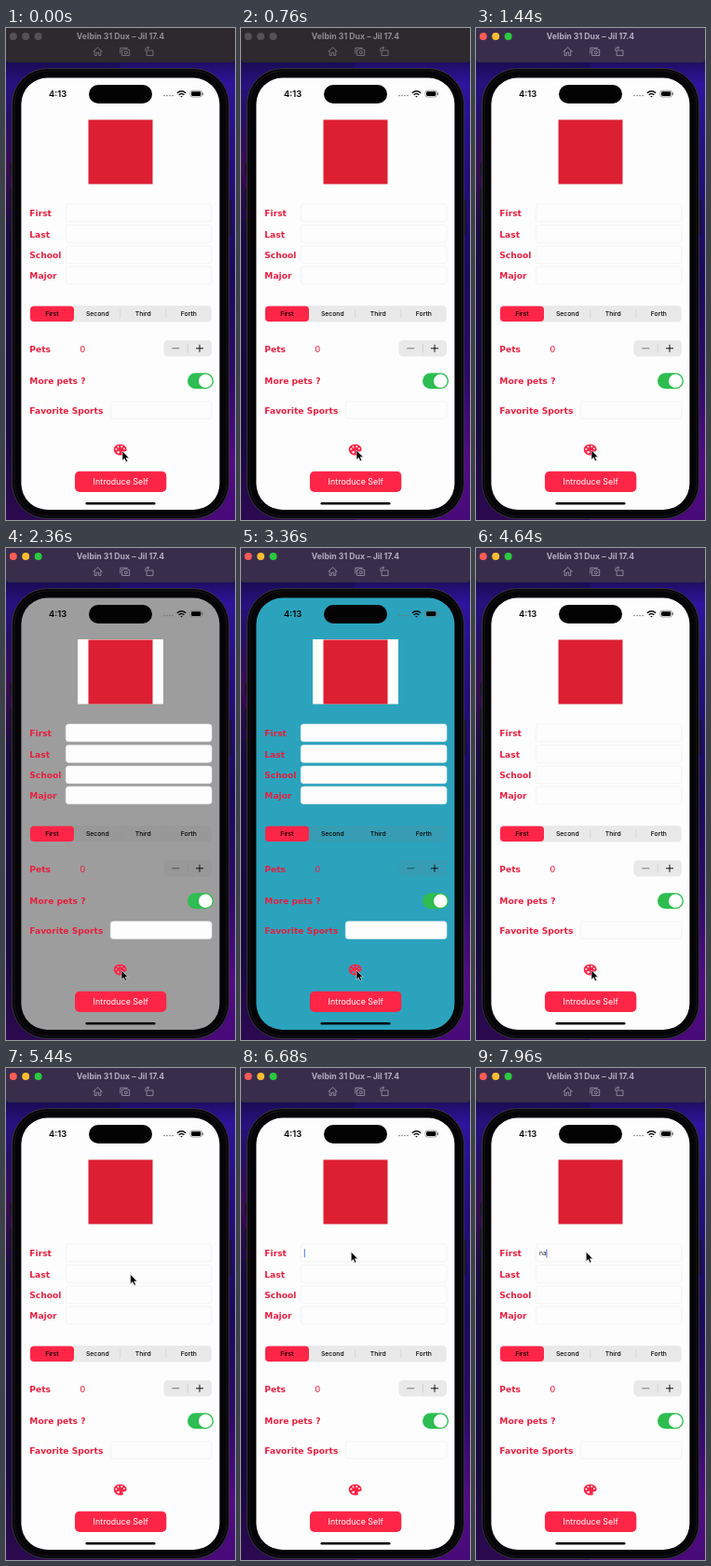
Animation, 246 px wide and 528 px high, one loop 8000 ms. Source, as an HTML page:

```html
<!DOCTYPE html>
<html lang="en">
<head>
<meta charset="utf-8">
<title>Simulator form</title>
<style>
  html, body { margin: 0; width: 100%; height: 100%; overflow: hidden; background: #1b0b50; }
  svg { display: block; width: 100vw; height: 100vh; }
  text { font-family: Inter, sans-serif; }
  .label { font: bold 9.15px "DejaVu Sans", sans-serif; fill: #e5203f; }
  .field { fill: #fdfdfd; stroke: #ececee; stroke-width: .6; }
  .tint { fill: #787880; fill-opacity: .15; }
  .red { fill: #fe2547; }
  .mid { text-anchor: middle; }
  .icon { fill: none; stroke-width: .8; stroke-linejoin: round; stroke-linecap: round; }
</style>
</head>
<body>
<svg viewBox="0 0 246 528" preserveAspectRatio="none">
  <defs>
    <linearGradient id="deskLeft" x2="0" y2="1">
      <stop offset=".08" stop-color="#28138a"/>
      <stop offset=".18" stop-color="#260f66"/>
      <stop offset=".28" stop-color="#380d50"/>
      <stop offset=".42" stop-color="#180a42"/>
      <stop offset=".8" stop-color="#15083c"/>
      <stop offset="1" stop-color="#2c0a50"/>
    </linearGradient>
    <linearGradient id="deskRight" x2="0" y2="1">
      <stop offset=".08" stop-color="#3016a4"/>
      <stop offset=".2" stop-color="#28108a"/>
      <stop offset=".5" stop-color="#1a0a5c"/>
      <stop offset=".7" stop-color="#2c0a66"/>
      <stop offset=".88" stop-color="#500c84"/>
      <stop offset="1" stop-color="#480a78"/>
    </linearGradient>
    <linearGradient id="shade" x2="0" y2="1">
      <stop offset="0" stop-opacity=".45"/>
      <stop offset="1" stop-opacity="0"/>
    </linearGradient>
  </defs>
  <rect width="123" height="528" fill="url(#deskLeft)"/>
  <rect x="123" width="123" height="528" fill="url(#deskRight)"/>
  <rect y="34" width="246" height="26" fill="url(#shade)"/>

  <!-- window bar -->
  <path id="bar" d="M0 0H246V33Q246 37 242 37H4Q0 37 0 33Z"/>
  <g id="lights"><circle cx="7.8" cy="9" r="4"/><circle cx="21.2" cy="9" r="4"/><circle cx="34.6" cy="9" r="4"/></g>
  <text id="title" class="mid" x="123" y="12" font-size="8.75" font-weight="700">Velbin 31 Dux – Jil 17.4</text>
  <g id="icons" class="icon">
    <path d="M93.8 25.2 98.5 20.8 103.2 25.2M95.2 24.5V29.5H97.3V26.3H99.7V29.5H101.8V24.5"/>
    <path d="M122.8 27.3V21.3H130.5M125 23.3H126.6L127.4 22.3H129.8L130.6 23.3H132.7V29.5H125Z"/>
    <circle cx="128.8" cy="26.3" r="1.6"/>
    <path d="M151.5 24H158V29.6H151.5ZM149.8 24.5V22.6Q149.8 21.2 151.2 21.2H153.5M152.3 20 153.6 21.2 152.3 22.4"/>
  </g>

  <!-- phone -->
  <path fill="#17141d" d="M4.5 145h3v13h-3zM4.5 172h3v24h-3zM4.5 204h3v24h-3zM238.5 184h3v38h-3z"/>
  <rect x="6.5" y="43.5" width="233" height="483" rx="38" fill="#050507" stroke="#35333b"/>
  <rect x="9" y="46" width="228" height="478" rx="36" fill="none" stroke="#17171b"/>
  <rect id="screen" x="16.4" y="53.6" width="213" height="463.4" rx="28"/>
  <rect x="89" y="61" width="68" height="20" rx="10" fill="#030304"/>
  <text x="46" y="74.2" font-size="9.4" font-weight="600">4:13</text>
  <g fill="#777"><circle cx="170" cy="72.5" r=".8"/><circle cx="173" cy="72.5" r=".8"/><circle cx="176" cy="72.5" r=".8"/><circle cx="179" cy="72.5" r=".8"/></g>
  <g fill="none" stroke="#090909" stroke-width="1.4">
    <path d="M183.8 69.8Q188.5 65.7 193.2 69.8M185.6 71.8Q188.5 69.2 191.4 71.8"/>
    <path d="M187.2 72.9H189.8L188.5 74.5Z" fill="#090909" stroke="none"/>
  </g>
  <rect x="198" y="67.2" width="12.4" height="6.8" rx="2" fill="none" stroke="#777" stroke-width=".7"/>
  <rect x="199.1" y="68.3" width="10.2" height="4.6" rx="1.1"/>
  <path d="M211.5 69.3v2.6" stroke="#777"/>

  <!-- picture stand-in -->
  <rect x="77" y="98" width="92" height="69.5" fill="#fdfdfd"/>
  <rect x="88.5" y="98.5" width="69" height="69" fill="#dd1f32"/>

  <g id="form"></g>
  <text id="typed" x="68" y="201.3" font-size="6.6" fill="#222"></text>
  <path id="caret" stroke="#3864d8" stroke-width=".9"/>

  <rect class="tint" x="25.5" y="298" width="195.3" height="17.5" rx="4.5"/>
  <path d="M122.7 302v9.5M171.7 302v9.5" stroke="#888" stroke-opacity=".25" stroke-width=".6"/>
  <rect class="red" x="26" y="298.6" width="47" height="16.3" rx="4"/>
  <g id="tabs" class="mid" font-size="6.8" font-weight="500"></g>

  <text class="label" x="25.3" y="347.5">Pets</text>
  <text x="79.2" y="347.8" style="font:9.5px 'DejaVu Sans',sans-serif;fill:#e5203f">0</text>
  <rect class="tint" x="169.5" y="335" width="51.5" height="17.5" rx="4.5"/>
  <path d="M195.3 339v9.5" stroke="#888" stroke-opacity=".4" stroke-width=".6"/>
  <path d="M178.3 343.8h8" stroke="#000" stroke-opacity=".5"/>
  <path d="M204 343.8h8M208 339.8v8" stroke="#111"/>

  <text class="label" x="25.3" y="382">More pets ?</text>
  <rect x="195" y="370.3" width="28" height="17" rx="8.5" fill="#2dbd50"/>
  <circle cx="214.3" cy="378.8" r="7.3" fill="#fff"/>

  <path class="red" fill-rule="evenodd" d="M122.8 446.8C127 446.8 129.6 449.5 129.6 452.2C129.6 454.9 127 454.3 125.8 454.8C124.6 455.6 126.8 457 125.4 458.2C121.5 459.6 115.8 457 115.8 452.2C115.8 449 118.8 446.8 122.8 446.8ZM117.4 452a1 1 0 1 0 2 0a1 1 0 1 0-2 0ZM119.5 449.4a1 1 0 1 0 2 0a1 1 0 1 0-2 0ZM123.3 449.2a1 1 0 1 0 2 0a1 1 0 1 0-2 0ZM126 451.4a.9.9 0 1 0 1.8 0a.9.9 0 1 0-1.8 0ZM119.4 455.3a1.3 1.3 0 1 0 2.6 0a1.3 1.3 0 1 0-2.6 0Z"/>
  <rect class="red" x="74" y="475.8" width="98.3" height="22.2" rx="5"/>
  <text class="mid" x="123.2" y="490.2" font-size="8.95" fill="#fff">Introduce Self</text>
  <rect x="85.5" y="509" width="75" height="2.6" rx="1.3" fill="#060606"/>

  <path id="cursor" d="M0 0V10.2L2.3 8.1 4 11.8 5.7 11 4.1 7.4H7.2Z" fill="#050505" stroke="#eee" stroke-width=".6" stroke-linejoin="round"/>
</svg>
<script>
const $ = id => document.getElementById(id);
const LOOP = 8000;

const field = (name, y, x = 64) =>
  `<text class="label" x="25.3" y="${y + 13.3}">${name}</text>
   <rect class="field" x="${x + .3}" y="${y}" width="${220.7 - x}" height="18.7" rx="3"/>`;
$('form').innerHTML = field('First', 189) + field('Last', 211.5) + field('School', 234) +
  field('Major', 256) + field('Favorite Sports', 400.7, 112);
$('tabs').innerHTML = ['First', 'Second', 'Third', 'Forth']
  .map((name, i) => `<text x="${49.3 + i * 49}" y="309.4">${name}</text>`).join('');

// Each list holds [start time, value]; the latest started entry applies.
const screens = [[0, '#fdfdfd'], [1800, '#9d9d9d'], [2840, '#2ba3bd'], [4600, '#fdfdfd']];
const typing = [[0, ''], [7360, 'n'], [7680, 'na']];
const current = (list, t) => list.filter(([start]) => start <= t).pop()[1];

const cursorPath = [[0, 125, 454], [500, 125, 454], [800, 124, 453], [4800, 124, 453],
  [5360, 133.7, 221.5], [5560, 133.7, 221.5], [6000, 118.3, 197.3], [LOOP, 118.3, 197.3]];
function cursorAt(t) {
  const i = cursorPath.findIndex(p => p[0] > t);
  const [t0, x0, y0] = cursorPath[i - 1], [t1, x1, y1] = cursorPath[i];
  const u = (t - t0) / (t1 - t0), k = u * u * (3 - 2 * u);
  return [x0 + (x1 - x0) * k, y0 + (y1 - y0) * k];
}

const themes = {
  idle: { bar: '#2d292e', title: '#8f8b92', icons: '#858088', lights: ['#555257', '#555257', '#555257'] },
  active: { bar: '#382e4b', title: '#b3acbf', icons: '#a29ab0', lights: ['#fb5d57', '#f8bd30', '#2dc840'] },
};

function draw(now) {
  const t = now % LOOP;
  const theme = t < 800 ? themes.idle : themes.active;
  $('bar').setAttribute('fill', theme.bar);
  $('title').setAttribute('fill', theme.title);
  $('icons').setAttribute('stroke', theme.icons);
  [...$('lights').children].forEach((light, i) => light.setAttribute('fill', theme.lights[i]));

  $('screen').setAttribute('fill', current(screens, t));
  $('cursor').setAttribute('transform', `translate(${cursorAt(t)})`);

  const typed = current(typing, t);
  $('typed').textContent = typed;
  const caretX = 68.3 + (typed ? $('typed').getComputedTextLength() : 0);
  $('caret').setAttribute('d', `M${caretX} 194.3v9`);
  const blinkOn = t >= 7360 || (t - 6200) % 1000 < 500;
  $('caret').setAttribute('opacity', t >= 6200 && blinkOn ? 1 : 0);
}

function tick() {
  draw(performance.now());
  requestAnimationFrame(tick);
}
tick();
</script>
</body>
</html>
```
